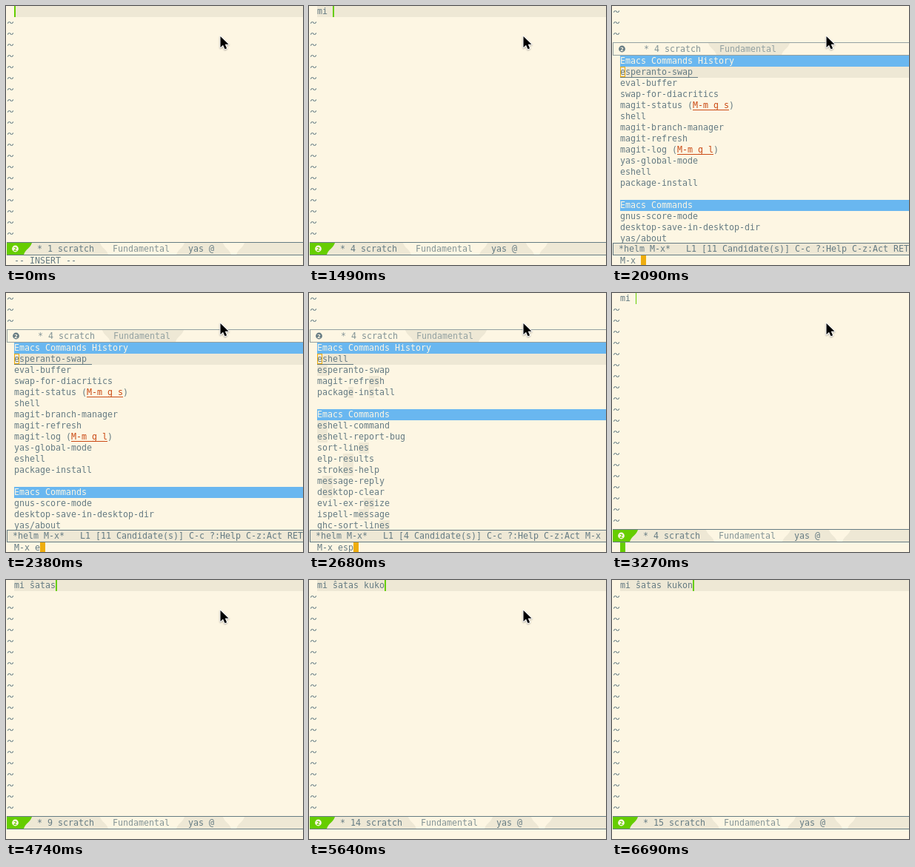
Recreate the animation shown at these times as an HTML page with a canvas. Size 401x350 px, loop 7140 ms.

```html
<!DOCTYPE html>
<html lang="en">
<head>
<meta charset="utf-8">
<title>Typing in scratch</title>
<style>
html, body { margin: 0; width: 100%; height: 100%; overflow: hidden; background: #fdf6e3; }
canvas { display: block; }
</style>
</head>
<body>
<canvas id="stage" width="401" height="350"></canvas>
<script>
const ctx = document.getElementById('stage').getContext('2d');
const W = 401, H = 350, LOOP = 7140, CW = 7, ROW = 15, LEFT = 11;
const C = {
  bg: '#fdf6e3', shade: '#eee8d5', text: '#657b83', dim: '#839496', faint: '#93a1a1',
  green: '#66cd00', gold: '#eead0e', blue: '#69b7f0', key: '#cb4b16'
};
const FONT = '11.63px "DejaVu Sans Mono", monospace';

const LINE = 'mi ŝatas kukon';
const KEYS = [750, 1050, 1490, 3860, 4150, 4450, 4600, 4740, 5040, 5190, 5340, 5490, 5640, 5940];
const PROMPT = [[2090, ''], [2380, 'e'], [2530, 'es'], [2680, 'esp']];
const OPEN = 2090, CLOSE = 3120, CLEAR = 3270, DONE = 3710;

const LISTS = [
  { at: 2090, match: '', info: '[11 Candidate(s)] C-c ?:Help C-z:Act RET',
    history: ['esperanto-swap', 'eval-buffer', 'swap-for-diacritics', 'magit-status (M-m g s)', 'shell',
      'magit-branch-manager', 'magit-refresh', 'magit-log (M-m g l)', 'yas-global-mode', 'eshell', 'package-install'],
    commands: ['gnus-score-mode', 'desktop-save-in-desktop-dir', 'yas/about'] },
  { at: 2530, match: 'es', info: '[4 Candidate(s)] C-c ?:Help C-z:Act M-x',
    history: ['eshell', 'esperanto-swap', 'magit-refresh', 'package-install'],
    commands: ['eshell-command', 'eshell-report-bug', 'sort-lines', 'elp-results', 'strokes-help',
      'message-reply', 'desktop-clear', 'evil-ex-resize', 'ispell-message', 'ghc-sort-lines'] },
  { at: 2830, match: 'esp', info: '[1 Candidate(s)] C-c ?:Help C-z:Act M-x',
    history: ['esperanto-swap'],
    commands: ['eshell-report-bug', 'strokes-help', 'message-reply', 'desktop-clear', 'desktop-save-in-desktop-dir'] }
];

function box(x, y, w, h, color) {
  ctx.fillStyle = color;
  ctx.fillRect(x, y, w, h);
}

function print(str, x, base, color = C.text) {
  ctx.font = FONT;
  ctx.fillStyle = color;
  ctx.fillText(str, x, base);
}

function tilde(y) {
  [0x71, 0xdb, 0x8e].forEach((bits, r) => {
    for (let i = 0; i < 8; i++) if (bits & (128 >> i)) box(2 + i, y + r, 1, 1, C.faint);
  });
}

// Band between two wavy edges; each edge is [x at top, x at bottom].
function band(y, h, [lt, lb], [rt, rb], color) {
  const m = y + h / 2, b = y + h;
  ctx.fillStyle = color;
  ctx.beginPath();
  ctx.moveTo(lt, y);
  ctx.lineTo(rt, y);
  ctx.bezierCurveTo((rt * 3 + rb) / 4, m, (rt + rb * 3) / 4, m, rb, b);
  ctx.lineTo(lb, b);
  ctx.bezierCurveTo((lt + lb * 3) / 4, m, (lt * 3 + lb) / 4, m, lt, y);
  ctx.fill();
}

function badge(x, y, color, ink) {
  ctx.fillStyle = color;
  ctx.beginPath();
  ctx.arc(x, y, 4.4, 0, Math.PI * 2);
  ctx.fill();
  ctx.font = 'bold 7px "DejaVu Sans", sans-serif';
  ctx.fillStyle = ink;
  ctx.textAlign = 'center';
  ctx.fillText('2', x, y + 2.6);
  ctx.textAlign = 'left';
}

function modeLine(count) {
  const y = 320, h = 16, d = count > 9 ? CW : 0;
  box(1, 319, W, 18, C.text);
  box(1, y, W, h, C.shade);
  band(y, h, [1, 1], [35, 24], C.green);
  band(y, h, [127 + d, 138 + d], [241 + d, 230 + d], C.bg);
  band(y, h, [293 + d, 304 + d], [322 + d, 311 + d], C.bg);
  badge(12.5, 328, C.bg, C.green);
  print('* ' + count + ' scratch', 42, 332);
  print('Fundamental', 144 + d, 332, C.dim);
  print('yas @', 246 + d, 332);
}

function idleModeLine(count) {
  box(1, 49, W, 18, C.faint);
  box(2, 50, W, 16, C.bg);
  band(50, 16, [130, 141], [240, 229], C.shade);
  badge(13.5, 58, C.text, C.bg);
  print('* ' + count + ' scratch', 43, 62, C.dim);
  print('Fundamental', 145, 62, C.faint);
}

function matches(name, pattern) {
  const whole = name.indexOf(pattern);
  let from = -1;
  return [...pattern].map((ch, i) => whole >= 0 ? whole + i : (from = name.indexOf(ch, from + 1)));
}

function candidate(name, y, pattern) {
  for (const i of matches(name, pattern)) box(LEFT + i * CW, y, CW, ROW, C.shade);
  const [, label, key] = name.match(/^([^(]*\(?)([^)]*)/);
  print(name, LEFT, y + 11);
  if (key) {
    const x = LEFT + label.length * CW, w = key.length * CW;
    box(x, y, w, ROW, C.bg);
    print(key, x, y + 11, C.key);
    box(x, y + 13, w, 1, C.key);
  }
}

function header(title, y) {
  box(LEFT, y, W, ROW, C.blue);
  print(title, LEFT, y + 11, C.bg);
}

function helm(t) {
  const list = LISTS.filter(l => t >= l.at).pop();
  const top = 67;
  for (let i = 0; i < 3; i++) tilde(i * ROW + 6);
  idleModeLine(4);

  header('Emacs Commands History', top);
  const first = top + ROW;
  box(LEFT, first, W, ROW, C.shade);
  list.history.forEach((name, i) => candidate(name, first + i * ROW, list.match));
  box(LEFT, first + 14, (list.history[0].length + 1) * CW, 1, C.text);
  ctx.strokeStyle = C.gold;
  ctx.lineWidth = 1;
  ctx.strokeRect(LEFT + 0.5, first + 0.5, CW - 1, ROW - 2);

  const second = first + (list.history.length + 1) * ROW;
  header('Emacs Commands', second);
  list.commands.forEach((name, i) => candidate(name, second + (i + 1) * ROW, list.match));

  box(1, 320, W, 17, C.text);
  box(2, 321, W, 15, C.shade);
  print('*helm M-x*   L1 ' + list.info, 9, 332);
  box(0, 337, W, 13, C.bg);
}

function prompt(t) {
  const str = 'M-x ' + PROMPT.filter(p => t >= p[0]).pop()[1];
  print(str, LEFT, 348);
  box(LEFT + str.length * CW, 337, CW, 13, C.gold);
}

function buffer(t) {
  const n = KEYS.filter(k => t >= k).length;
  const away = t >= CLOSE && t < DONE;
  if (!away) box(LEFT, 0, W, ROW, C.shade);
  print(LINE.slice(0, n), LEFT, 11);
  box(LEFT + n * CW, 0, away ? 1 : 2, ROW, C.green);
  for (let i = 1; i <= 20; i++) tilde(i * ROW + 6);
  modeLine(n + 1);
  if (t < KEYS[0]) print('-- INSERT --', LEFT, 348);
  if (away && t < CLEAR) prompt(t);
  else if (away) box(LEFT, 337, CW, 13, C.green);
}

function pointer(t) {
  if (t >= 6690) return;
  const [x, y] = t < 6390 ? [289.5, 41] : t < 6540 ? [300, 92] : [332, 335];
  const shape = new Path2D('M0 0V15L3.5 11.8L6 17.3L8.6 16.2L6.2 10.8H11Z');
  ctx.save();
  ctx.translate(x, y);
  ctx.lineJoin = 'round';
  ctx.lineWidth = 2;
  ctx.strokeStyle = '#fff';
  ctx.shadowColor = 'rgba(0,0,0,.3)';
  ctx.shadowBlur = 2;
  ctx.shadowOffsetY = 1;
  ctx.stroke(shape);
  ctx.shadowColor = 'transparent';
  ctx.fillStyle = '#000';
  ctx.fill(shape);
  ctx.restore();
}

function draw() {
  const t = performance.now() % LOOP;
  box(0, 0, W, H, C.bg);
  if (t >= OPEN && t < CLOSE) {
    helm(t);
    prompt(t);
  } else {
    buffer(t);
  }
  pointer(t);
  requestAnimationFrame(draw);
}
draw();
</script>
</body>
</html>
```
